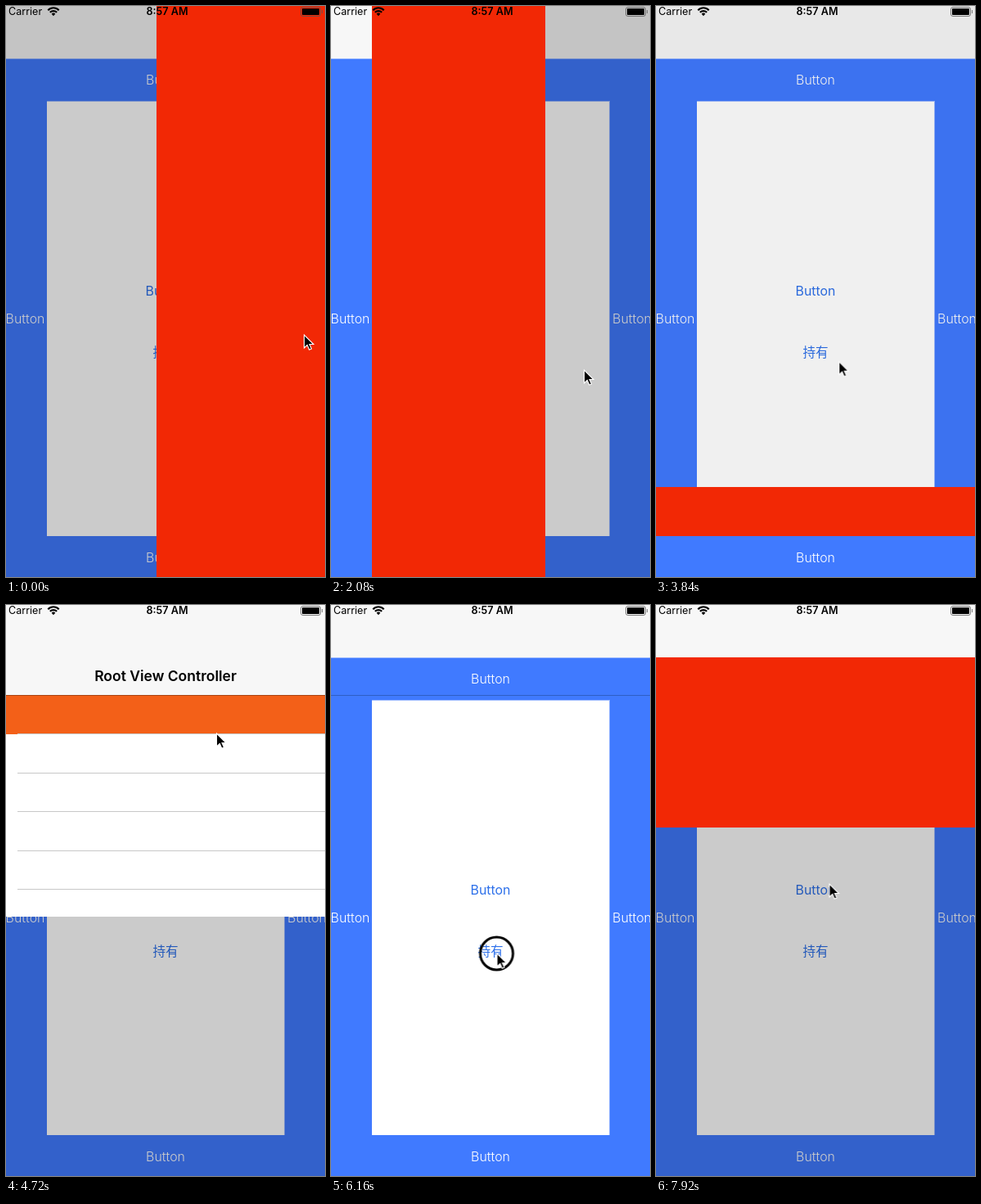
Recreate the animation shown at these times as an HTML page. Size 390 by 698 pixels, loop 8000 ms.

```html
<!DOCTYPE html>
<html lang="en">
<head>
<meta charset="utf-8">
<title>Edge panels</title>
<style>
@property --p { syntax: "<number>"; inherits: true; initial-value: 0; }

:root { --blue: #407aff; --link: #2d70ea; --red: #f22805; --bar: #f7f7f7; --line: #c8c8c8; --edge: #9fbcff; }
html, body { margin: 0; width: 100%; height: 100%; overflow: hidden; }
body { position: relative; background: #fff; font: 350 15.9px/20px Inter, "Noto Sans CJK SC", "Noto Sans CJK", sans-serif; }
div, svg, span { position: absolute; }
span { white-space: nowrap; transform: translate(-50%, -50%); }
.fill { inset: 0; overflow: hidden; }

/* One loop is 8 s, so 1% lasts 80 ms. */
.anim { animation: 8s ease-in-out infinite; }

/* Screens share one layout: blue frame, white centre, five buttons. */
.screen { background: var(--blue); color: #fff; overflow: hidden; }
.centre { left: 50px; width: 291px; background: #fff; box-shadow: inset -1px 1px var(--edge); }
.link { color: var(--link); font-weight: 400; }
.cjk { font: 350 15.6px/20px "Noto Sans CJK SC", "Noto Sans CJK", sans-serif; }
.west { left: 23.5px; }
.east { left: 368px; }
.mid { left: 195px; }

/* Each region dims its area and grows a panel by --p. */
.region { inset: 0; overflow: hidden; }
.dim { inset: 0; background: #000; opacity: calc(var(--p) * .205); }
.panel { background: var(--red); overflow: hidden; }

#right { animation-name: right; }
#right .panel { right: 0; width: calc(var(--p) * 206px); height: 100%; }
#left { left: 50px; animation-name: left; }
#left .panel { left: 0; width: calc(var(--p) * 212px); height: 100%; }
#bottom { bottom: 50px; animation-name: bottom; }
#bottom .panel { bottom: 0; width: 100%; height: calc(var(--p) * 208px); }
#top { top: 64px; animation-name: top; }
#top .panel { width: 100%; height: calc(var(--p) * 208px); }
#nested { top: 64px; animation-name: nested; }
#nested .panel { width: 100%; height: calc(var(--p) * 317px); background: #fff; }

@keyframes right { 0%, 7% { --p: 1 } 11%, 100% { --p: 0 } }
@keyframes left { 0%, 18.5% { --p: 0 } 22.5%, 29% { --p: 1 } 33%, 100% { --p: 0 } }
@keyframes bottom { 0%, 37.17% { --p: 0 } 41.17%, 45.5% { --p: 1 } 49.5%, 100% { --p: 0 } }
@keyframes top { 0%, 95% { --p: 0 } 98.5%, 100% { --p: 1 } }
@keyframes nested {
  0%, 53.5% { --p: 0 } 57.5%, 70% { --p: 1 } 74%, 78.2% { --p: 0 }
  82.2%, 87.6% { --p: 1 } 91.6%, 100% { --p: 0 }
}

.navbar { width: 100%; height: 46px; background: var(--bar); box-shadow: 0 1px rgba(0, 0, 0, .3); }
#title { left: 0; width: 390px; top: 13px; text-align: center; font-size: 17.5px; font-weight: 600; color: #000; animation-name: title; }
#back { left: 0; width: 390px; height: 46px; color: var(--link); font-size: 17.2px; animation-name: back; }
#back span { left: 24px; top: 23px; transform: translateY(-50%); }
@keyframes title { 0%, 59.3% { opacity: 1; transform: none } 63.7%, 100% { opacity: 0; transform: translateX(-88px) } }
@keyframes back { 0%, 59.3% { opacity: 0; transform: translateX(88px) } 63.7%, 100% { opacity: 1; transform: none } }

#table { top: 46px; width: 100%; height: 271px; animation-name: slideAway;
  background: linear-gradient(var(--line) 0 0) 14px 47px / 100% 1px no-repeat, linear-gradient(var(--line) 0 0) 14px 95px / 100% 1px no-repeat,
    linear-gradient(var(--line) 0 0) 14px 142px / 100% 1px no-repeat, linear-gradient(var(--line) 0 0) 14px 190px / 100% 1px no-repeat,
    linear-gradient(var(--line) 0 0) 14px 237px / 100% 1px no-repeat, #fff; }
#row { width: 100%; height: 48px; background: #f36018; animation-name: row; animation-timing-function: step-end; }
#row::after { content: ""; position: absolute; left: 14px; right: 0; bottom: 0; height: 1px; background: var(--line); }
#pushed { top: 46px; width: 100%; height: 271px; animation-name: push; }
@keyframes row { 0% { opacity: 0 } 57.6% { opacity: 1 } 64%, 100% { opacity: 0 } }
@keyframes slideAway { 0%, 59.3% { transform: none } 63.7%, 100% { transform: translateX(-30%) } }
@keyframes push { 0%, 59.3% { transform: translateX(100%) } 63.7%, 100% { transform: none } }

#hairline { top: 110px; width: 100%; height: 1px; background: #2f5fc4; animation-name: hairline; animation-timing-function: step-end; }
@keyframes hairline { 0% { opacity: 0 } 73.9% { opacity: 1 } 78.2%, 100% { opacity: 0 } }

#pressed { animation-name: pressed; }
@keyframes pressed { 0%, 36.3% { opacity: 1 } 36.4%, 39.2% { opacity: .42 } 42%, 100% { opacity: 1 } }

#status { width: 390px; height: 16px; font-size: 12.6px; line-height: 14px; font-weight: 400; color: #000; }

#cursor { left: 0; top: 0; width: 0; height: 0; animation-name: cursor; }
#cursor svg { left: -24px; top: -24px; overflow: visible; }
#ring { animation-name: ring; animation-timing-function: step-end; }
@keyframes cursor {
  0% { transform: translate(364px, 402px) }
  5.5%, 8% { transform: translate(120px, 410px) }
  16.5%, 19% { transform: translate(39px, 397px) }
  26% { transform: translate(309px, 445px) }
  27.5%, 29.5% { transform: translate(312px, 448px) }
  35.8%, 39.2% { transform: translate(238px, 674px) }
  43.8%, 46% { transform: translate(232px, 440px) }
  51%, 53.8% { transform: translate(206px, 424px) }
  57.2%, 58.2% { transform: translate(250px, 146px) }
  59%, 61% { transform: translate(257px, 157px) }
  67.5%, 70.5% { transform: translate(245px, 470px) }
  75.5%, 78.5% { transform: translate(202.5px, 426px) }
  85.5%, 90% { transform: translate(234px, 400px) }
  93.5%, 100% { transform: translate(211.5px, 341px) }
}
@keyframes ring {
  0% { opacity: 0 } 6% { opacity: 1 } 7.5% { opacity: 0 }
  17.4% { opacity: 1 } 18.9% { opacity: 0 }
  28% { opacity: 1 } 29.4% { opacity: 0 }
  36.4% { opacity: 1 } 37.8% { opacity: 0 }
  44.5% { opacity: 1 } 45.9% { opacity: 0 }
  52.7% { opacity: 1 } 53.9% { opacity: 0 }
  57.3% { opacity: 1 } 58.5% { opacity: 0 }
  68.9% { opacity: 1 } 70.4% { opacity: 0 }
  76.5% { opacity: 1 } 78.4% { opacity: 0 }
  86.5% { opacity: 1 } 88% { opacity: 0 }
  94% { opacity: 1 } 95.5%, 100% { opacity: 0 }
}
</style>
</head>
<body>
<div class="fill" style="width:390px;height:698px">
  <div class="screen fill">
    <div style="width:100%;height:64px;background:var(--bar);box-shadow:0 1px var(--edge)"></div>
    <div class="centre" style="top:116px;height:532px"></div>
    <span class="mid" style="top:91px">Button</span>
    <span class="west" style="top:383px">Button</span>
    <span class="east" style="top:383px">Button</span>
    <span class="mid link" style="top:349px">Button</span>
    <span class="mid link cjk" style="top:422px">持有</span>
    <span class="mid anim" id="pressed" style="top:675px">Button</span>
    <div class="anim" id="hairline"></div>
  </div>

  <div class="region anim" id="right"><div class="dim"></div><div class="panel"></div></div>
  <div class="region anim" id="left"><div class="dim"></div><div class="panel"></div></div>
  <div class="region anim" id="bottom"><div class="dim"></div><div class="panel"></div></div>
  <div class="region anim" id="top"><div class="dim"></div><div class="panel"></div></div>
  <div class="region anim" id="nested">
    <div class="dim"></div>
    <div class="panel">
      <div class="anim" id="table"><div class="anim" id="row"></div></div>
      <div class="screen anim" id="pushed">
        <div class="centre" style="top:39px;height:182px"></div>
        <span class="mid" style="top:20px">Button</span>
        <span class="west" style="top:130px">Button</span>
        <span class="east" style="top:130px">Button</span>
        <span class="mid link" style="top:112px">Button</span>
        <span class="mid link cjk" style="top:185px">持有</span>
        <span class="mid" style="top:247px">Button</span>
      </div>
      <div class="navbar">
        <div class="anim" id="title">Root View Controller</div>
        <div class="anim" id="back">
          <svg width="24" height="46"><path d="M18 12.5 7.8 23 18 33.5" fill="none" stroke="#2d70ea" stroke-width="3"/></svg>
          <span>Root View Controller</span>
        </div>
      </div>
    </div>
  </div>

  <div id="status">
    <span style="left:3px;top:7px;transform:translateY(-50%)">Carrier</span>
    <span style="left:197px;top:7px;font-weight:600">8:57 AM</span>
    <svg width="390" height="16" fill="none" stroke="#000">
      <path d="M51.3 5.2a9.2 9.2 0 0 1 13.4 0M53.8 7.8a6 6 0 0 1 8.4 0" stroke-width="2.1"/>
      <path d="M55.6 9.6a3.4 3.4 0 0 1 4.8 0L58 12.2z" fill="#000" stroke="none"/>
      <rect x="360.5" y="1.5" width="24" height="11" rx="2.5" stroke="#555" stroke-opacity=".75"/>
      <rect x="362" y="3" width="21" height="8" rx="1" fill="#000" stroke="none"/>
      <path d="M386.5 5v4" stroke="#555" stroke-opacity=".75"/>
    </svg>
  </div>

  <div class="anim" id="cursor">
    <svg width="48" height="48" viewBox="-24 -24 48 48">
      <circle class="anim" id="ring" r="20" fill="none" stroke="#000" stroke-width="3"/>
      <path d="M.5 0v16l3.8-3.5 2.5 5.7 2.7-1.2-2.5-5.5h5z" stroke="#fff" stroke-width="1.1"/>
    </svg>
  </div>
</div>
</body>
</html>
```
